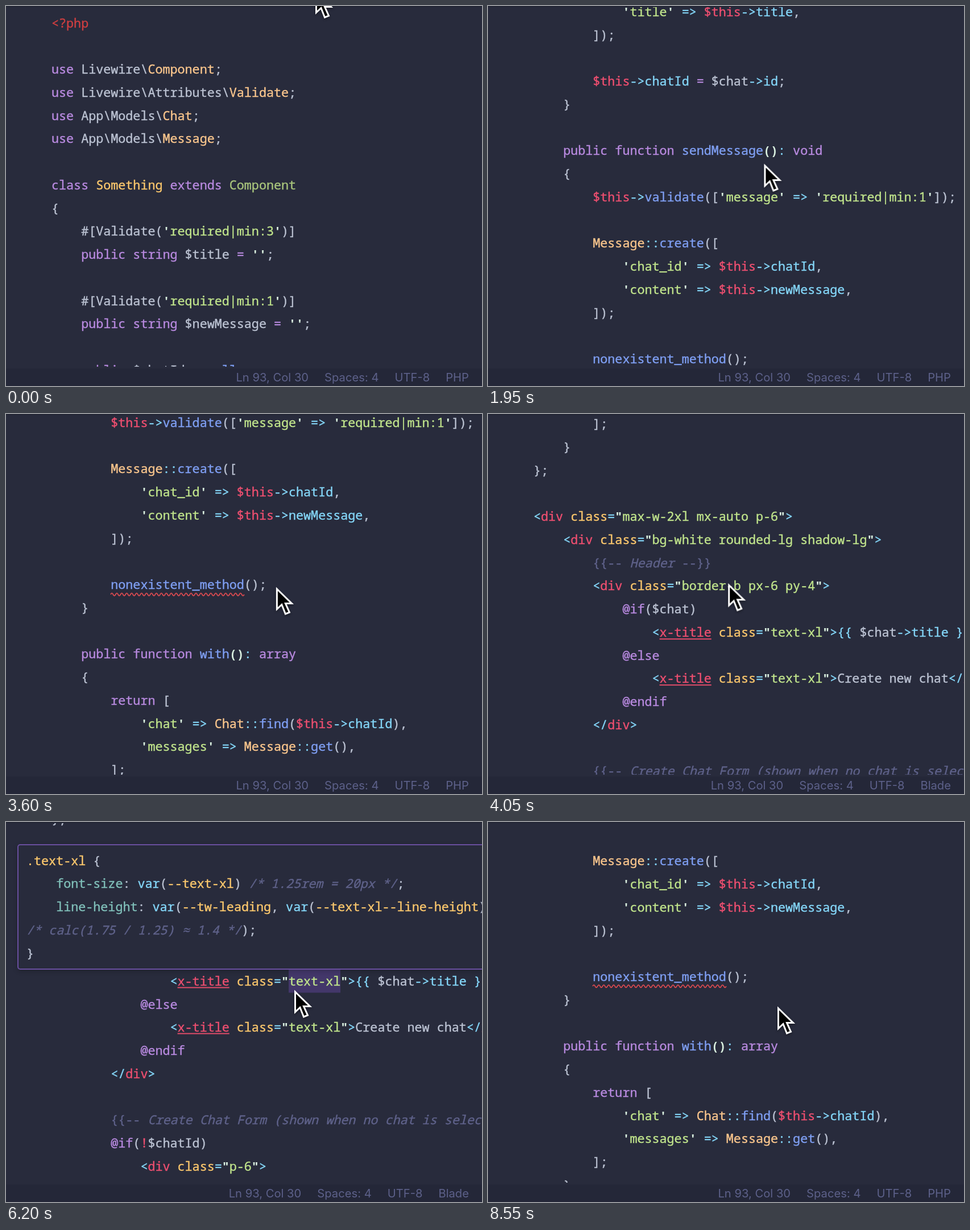
An HTML page that plays this animation: 837x669 px, repeating every 8.6 s.

```html
<!DOCTYPE html>
<html lang="en">
<head>
<meta charset="utf-8">
<title>Code editor hovers</title>
<style>
  :root { --bg: #282b3c; --loop: 8600ms infinite; }
  html, body { margin: 0; width: 100%; height: 100%; overflow: hidden; background: var(--bg); }
  #stage { position: relative; width: 837px; height: 669px; overflow: hidden; background: var(--bg); }
  #stage * { position: absolute; }
  #stage span { position: static; }

  pre, .mark {
    margin: 0; white-space: pre; color: #bcc3d3;
    font: 21.73px/40.75px "Noto Sans Mono", "DejaVu Sans Mono", monospace;
    font-variant-ligatures: none; -webkit-text-stroke: .4px;
  }
  .p { color: #b98ae0; } .o { color: #fac68d; } .y { color: #fcc86d; }
  .g { color: #c1e58c; } .b { color: #7f9ff3; } .c { color: #84d6f8; }
  .r { color: #ee4f70; } .t { color: #ce3f41; } .e { color: #a9c57c; }
  .l { color: #80c0ba; } .w { color: #daf0e0; font-weight: 700; -webkit-text-stroke: 0; }
  .m { color: #5f628a; } .i { color: #5f628a; font-style: italic; }
  .x { color: #ee4f70; text-decoration: underline 2px #e04c69; text-underline-offset: 3px; text-decoration-skip-ink: none; }

  #view { left: 0; top: 0; width: 837px; height: 635px; overflow: hidden; }
  #scroll { left: 80px; top: 9.6px; animation: scroll var(--loop); }
  #code { left: 0; top: 0; }
  .mark { height: 40.75px; background: #43376a; }
  #mark1 { left: 24ch; top: calc(7 * 40.75px); width: 9ch; }
  #mark2 { left: 32ch; top: calc(59 * 40.75px); width: 7ch; }
  #wave { left: 104px; top: calc(42 * 40.75px + 32px); width: 236px; height: 12px; overflow: visible; }
  #edge { left: 0; top: 0; width: 837px; height: 2px; background: #212433; }

  .status {
    left: 0; top: 638px; width: 814px; height: 31px; padding-right: 23px;
    display: flex; justify-content: flex-end; gap: 28px; background: #242738;
    font: 20.2px/32px Inter, "Open Sans", sans-serif; color: #5d618a; white-space: pre;
  }

  .pop { box-sizing: border-box; border: 2px solid #694f9f; border-radius: 5px; background: var(--bg); box-shadow: 0 3px 9px #0003; }
  #pop1 { left: 258px; top: 334px; width: 556px; height: 420px; }
  #pop1 pre { left: 14px; top: 61.6px; }
  #pop1 b { left: 14px; top: 13px; font: 700 20.4px/30px Inter, "Open Sans", sans-serif; color: #fff; }
  #pop1 i { right: 0; top: 0; width: 17px; height: 204px; background: #43376a; }
  #pop2 { left: 20px; top: 39px; width: 900px; height: 221px; }
  #pop2 pre { left: 14px; top: 6.6px; }

  #pop1, #mark1 { animation: hover1 var(--loop) step-end; }
  #pop2, #mark2 { animation: hover2 var(--loop) step-end; }
  #blade { animation: blade var(--loop) step-end; }
  #cursor { left: 0; top: 0; width: 34px; height: 52px; overflow: visible; filter: drop-shadow(0 2px 2px #0006); animation: move var(--loop) ease-in-out; }

  @keyframes scroll {
    0%, 19.19% { transform: none; animation-timing-function: cubic-bezier(.4, 0, .2, 1); }
    26.16%, 42.44% { transform: translateY(-1440.75px); animation-timing-function: cubic-bezier(.4, 0, .2, 1); }
    50.58%, 74.42% { transform: translateY(-2154.5px); animation-timing-function: cubic-bezier(.4, 0, .2, 1); }
    83.14%, 100% { transform: translateY(-1469.4px); }
  }
  @keyframes hover1 { 0%, 18.6%, 100% { visibility: hidden; } 11.05% { visibility: visible; } }
  @keyframes hover2 { 0%, 73.8%, 100% { visibility: hidden; } 63.95% { visibility: visible; } }
  @keyframes blade { 0%, 79%, 100% { visibility: hidden; } 46.5% { visibility: visible; } }
  @keyframes move {
    0% { transform: translate(543px, -28px); }
    10.5%, 18.6% { transform: translate(458px, 308px); }
    26.7%, 38% { transform: translate(510px, 247px); animation-timing-function: ease-in; }
    41.86% { transform: translate(474px, 304px); animation-timing-function: ease-out; }
    50%, 54% { transform: translate(410px, 296px); animation-timing-function: ease-in; }
    55.81% { transform: translate(417px, 295px); animation-timing-function: ease-out; }
    61.6%, 74% { transform: translate(506px, 295px); }
    83%, 100% { transform: translate(508px, 324px); }
  }
</style>
</head>
<body>
<div id="stage">
  <div id="view">
    <div id="scroll">
      <div class="mark" id="mark1"></div>
      <div class="mark" id="mark2"></div>
      <pre id="code"></pre>
      <svg id="wave"><path fill="none" stroke="#d84a50" stroke-width="1.8"/></svg>
    </div>
  </div>
  <div id="edge"></div>
  <div class="status"><span>Ln 93, Col 30</span><span>Spaces: 4</span><span>UTF-8</span><span>PHP</span></div>
  <div class="status" id="blade"><span>Ln 93, Col 30</span><span>Spaces: 4</span><span>UTF-8</span><span>Blade</span></div>
  <div class="pop" id="pop1"><b>Livewire\Component</b><pre></pre><i></i></div>
  <div class="pop" id="pop2"><pre></pre></div>
  <svg id="cursor"><path d="M2.5 4V39.5L11 31.5L17.5 48L24.5 45.2L17.5 29.5H28.5Z" fill="#000" stroke="#fff" stroke-width="3"/></svg>
</div>
<script>
  // Markup: ~k:text~ gives text the colour class k.
  const paint = src => src.replace(/&/g, '&amp;').replace(/</g, '&lt;')
    .replace(/~(\w):(.*?)~/g, '<span class="$1">$2</span>');
  const show = (sel, src) => { document.querySelector(sel).innerHTML = paint(src); };

  const str = s => `~w:'~~g:${s}~~w:'~`;
  const self = name => `~r:$this~~c:->${name}~`;
  const call = name => `~r:$this~~c:->~~b:${name}~`;
  const fn = name => `~p:public function~ ~b:${name}~`;
  const tag = (name, cls, key = 'r') =>
    `~c:<~~${key}:${name}~ ~y:class~~c:=~~w:"~~g:${cls}~~w:"~~c:>~`;
  const to = '~c:=>~';

  show('#code', String.raw`~t:<?php~

~p:use~ Livewire\~o:Component~;
~p:use~ Livewire\Attributes\~o:Validate~;
~p:use~ App\Models\~o:Chat~;
~p:use~ App\Models\~o:Message~;

~p:class~ ~y:Something~ ~p:extends~ ~e:Component~
{
    #[Validate(${str('required|min:3')})]
    ~p:public string~ $title ~p:=~ ~w:''~;

    #[Validate(${str('required|min:1')})]
    ~p:public string~ $newMessage ~p:=~ ~w:''~;

    ~p:public~ $chatId ~p:=~ ~b:null~;

    ${fn('mount')}~w:(~$chatId ~p:=~ ~b:null~~w:)~~c::~ ~p:void~
    {
        ${self('chatId')} ~p:=~ $chatId;
    }

    ${fn('createChat')}~w:()~~c::~ ~p:void~
    {
        ${call('validate')}([${str('title')} ${to} ${str('required|min:3')}]);

        $chat ~p:=~ ~o:Chat~~c:::~~b:create~([
            ${str('title')} ${to} ${self('title')},
        ]);

        ${self('chatId')} ~p:=~ $chat~c:->id~;
    }

    ${fn('sendMessage')}~w:()~~c::~ ~p:void~
    {
        ${call('validate')}([${str('message')} ${to} ${str('required|min:1')}]);

        ~o:Message~~c:::~~b:create~([
            ${str('chat_id')} ${to} ${self('chatId')},
            ${str('content')} ${to} ${self('newMessage')},
        ]);

        ~b:nonexistent_method~();
    }

    ${fn('with')}~w:()~~c::~ ~p:array~
    {
        ~p:return~ [
            ${str('chat')} ${to} ~o:Chat~~c:::~~b:find~(${self('chatId')}),
            ${str('messages')} ${to} ~o:Message~~c:::~~b:get~(),
        ];
    }
};

${tag('div', 'max-w-2xl mx-auto p-6')}
    ${tag('div', 'bg-white rounded-lg shadow-lg')}
        ~m:{{--~ ~i:Header~ ~m:--}}~
        ${tag('div', 'border-b px-6 py-4')}
            ~p:@if~($chat)
                ${tag('x-title', 'text-xl', 'x')}~c:{{~ $chat~c:->title }}</~~r:x-title~~c:>~
            ~p:@else~
                ${tag('x-title', 'text-xl', 'x')}Create new chat~c:</~~r:x-title~~c:>~
            ~p:@endif~
        ~c:</~~r:div~~c:>~

        ~m:{{--~ ~i:Create Chat Form (shown when no chat is selected)~ ~m:--}}~
        ~p:@if~(~r:!~$chatId)
            ${tag('div', 'p-6')}`);

  show('#pop1 pre', `~t:<?php~
~p:abstract class~ ~y:Component~
{
    ~p:use~ ~o:Macroable~,
        ~o:AuthorizesRequests~,
        ~o:InteractsWithProperties~,
        ~o:HandlesEvents~,`);

  show('#pop2 pre', `~y:.text-xl~ {
    ~l:font-size~: ~c:var~(~y:--text-xl~) ~i:/* 1.25rem = 20px */~;
    ~l:line-height~: ~c:var~(~y:--tw-leading~, ~c:var~(~y:--text-xl--line-height~)
~i:/* calc(1.75 / 1.25) ≈ 1.4 */~);
}`);

  document.querySelector('#wave path')
    .setAttribute('d', 'M0 5.5' + 'q2.18 -4.6 4.35 0t4.35 0'.repeat(27));
</script>
</body>
</html>
```
